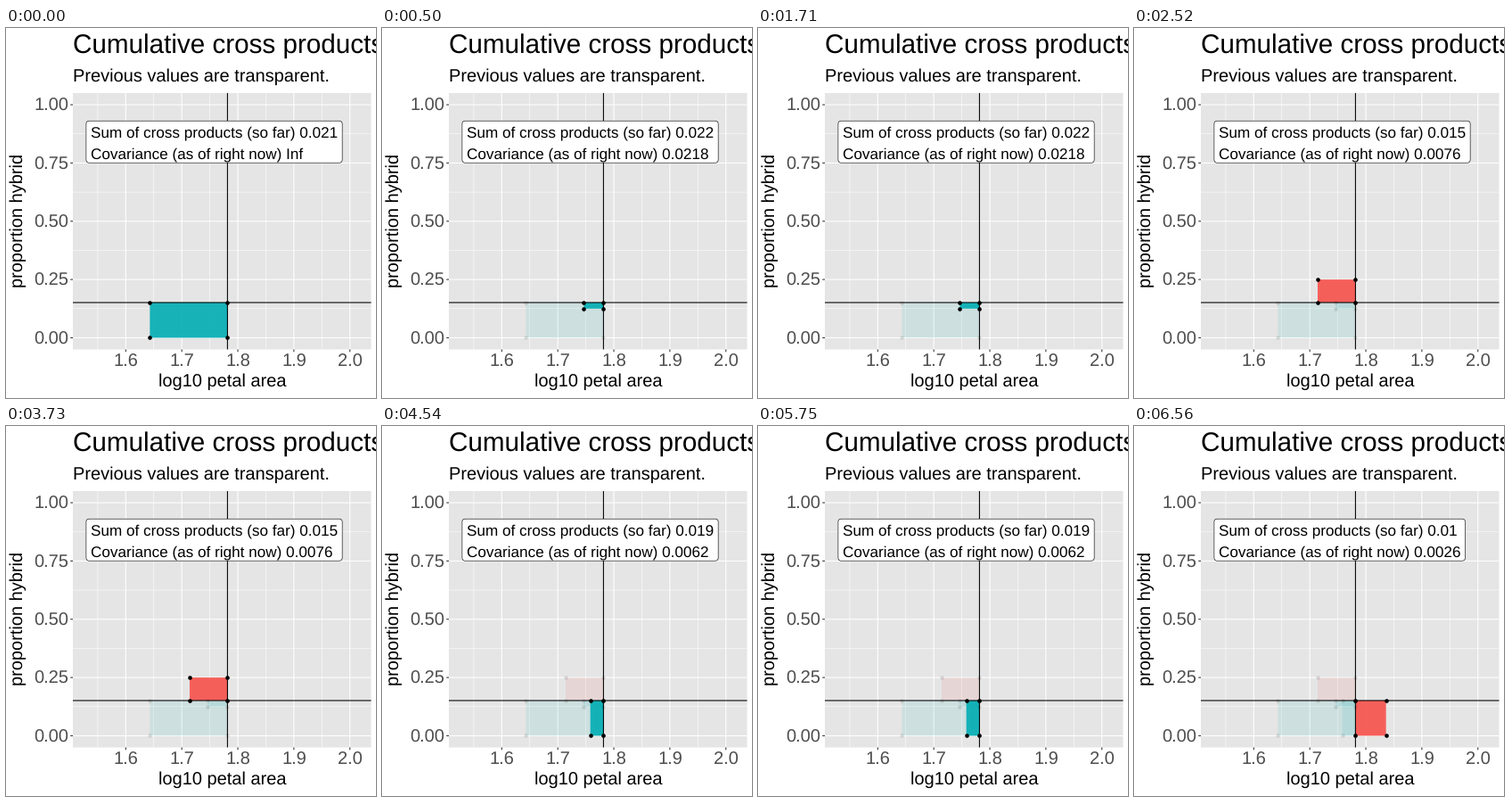
A matplotlib script for the animation above (8000 ms loop, 415 px wide and 415 px high).

```python
import numpy as np
import matplotlib.pyplot as plt
from matplotlib.animation import FuncAnimation
from matplotlib.patches import FancyBboxPatch, Rectangle

SIZE, DPI = 415, 80
PT = 72 / DPI  # points per pixel
INTERVAL, LOOP = 20, 8000
STARTS = (0, 500, 2520, 4540, 6560)

MEAN_X, MEAN_Y = 1.7815, 0.1511
DATA = [(1.643, 0), (1.7465, 0.125), (1.714, 0.25), (1.758, 0), (1.836, 0)]
TEAL, RED = "#00ADB3", "#F7504B"
LEFT, RIGHT, TOP, BOTTOM = 75, 409.5, 73, 360.5

plt.rcParams.update({"font.family": "Liberation Sans", "text.hinting": "none",
                     "path.snap": False})


def px(x):
    return 134.33 + (x - 1.6) * 628.5


def py(y):
    return 347.45 - y * 261.4


fig = plt.figure(figsize=(SIZE / DPI, SIZE / DPI), dpi=DPI, facecolor="white")
ax = fig.add_axes([0, 0, 1, 1])
ax.set_xlim(0, SIZE)
ax.set_ylim(SIZE, 0)
ax.axis("off")


def label(x, y, text, size=20, color="black", **kw):
    return ax.text(x, y, text, fontsize=size * PT, color=color,
                   va="baseline", **kw)


def lines(xs, ys, color, width, z):
    ax.vlines(xs, TOP, BOTTOM, colors=color, linewidths=width * PT, zorder=z)
    ax.hlines(ys, LEFT, RIGHT, colors=color, linewidths=width * PT, zorder=z)


# Panel, grid and axes
ax.add_patch(Rectangle((LEFT, TOP), RIGHT - LEFT, BOTTOM - TOP,
                       color="#E5E5E5", lw=0, zorder=0))
x_ticks, y_ticks = np.arange(1.6, 2.05, 0.1), np.arange(0, 1.1, 0.25)
lines(px(x_ticks - 0.05), py(y_ticks[:-1] + 0.125), "white", 0.53, 1)
lines(px(x_ticks), py(y_ticks), "white", 1.07, 1)
ax.vlines(px(x_ticks), BOTTOM, BOTTOM + 2.75, colors="#333333",
          linewidths=1.07 * PT)
ax.hlines(py(y_ticks), LEFT - 2.75, LEFT, colors="#333333",
          linewidths=1.07 * PT)
for x in x_ticks:
    label(px(x), 379.4, f"{x:.1f}", color="#4D4D4D", ha="center")
for y in y_ticks:
    label(70, py(y) + 7, f"{y:.2f}", color="#4D4D4D", ha="right")

label(75, 27.4, "Cumulative cross products", 29.6)
label(75, 59.4, "Previous values are transparent.")
label((LEFT + RIGHT) / 2, 401.5, "log10 petal area", ha="center")
label(19.3, 215.6, "proportion hybrid", ha="center", rotation=90,
      rotation_mode="anchor")

# Cross products around the means
lines([px(MEAN_X)], [py(MEAN_Y)], "black", 1.07, 3)
rects, dots, products = [], [], []
for x, y in DATA:
    product = (x - MEAN_X) * (y - MEAN_Y)
    products.append(product)
    x0, y0, x1, y1 = px(MEAN_X), py(MEAN_Y), px(x), py(y)
    rects.append(ax.add_patch(Rectangle(
        (x0, y0), x1 - x0, y1 - y0, lw=0, zorder=2,
        facecolor=TEAL if product > 0 else RED)))
    dots.append(ax.scatter([x0, x0, x1, x1], [y0, y1, y0, y1],
                           s=(4.6 * PT) ** 2, c="black", lw=0, zorder=4))
totals = np.cumsum(products)

# Running summary
box = ax.add_patch(FancyBboxPatch(
    (89.9, 104.2), 286, 47, boxstyle="round,pad=0,rounding_size=3.5",
    fc="white", ec="black", lw=0.6 * PT, zorder=5))
sum_text = label(95, 122.2, "", 17.07, zorder=6)
cov_text = label(95, 146.4, "", 17.07, zorder=6)


def update(frame):
    step = sum(frame * INTERVAL >= start for start in STARTS) - 1
    for i, (rect, dot) in enumerate(zip(rects, dots)):
        for artist in (rect, dot):
            artist.set_visible(i <= step)
        rect.set_alpha(0.9 if i == step else 0.1)
        dot.set_alpha(1 if i == step else 0.1)
    total = totals[step]
    cov = f"{round(total / step, 4):g}" if step else "Inf"
    sum_text.set_text(f"Sum of cross products (so far) {round(total, 3):g}")
    cov_text.set_text(f"Covariance (as of right now) {cov}")
    right = max(t.get_window_extent().x1 for t in (sum_text, cov_text))
    box.set_width(right + 5 - box.get_x())
    return [*rects, *dots, box, sum_text, cov_text]


anim = FuncAnimation(fig, update, frames=LOOP // INTERVAL, interval=INTERVAL,
                     repeat=True, repeat_delay=0)
plt.show()
```
